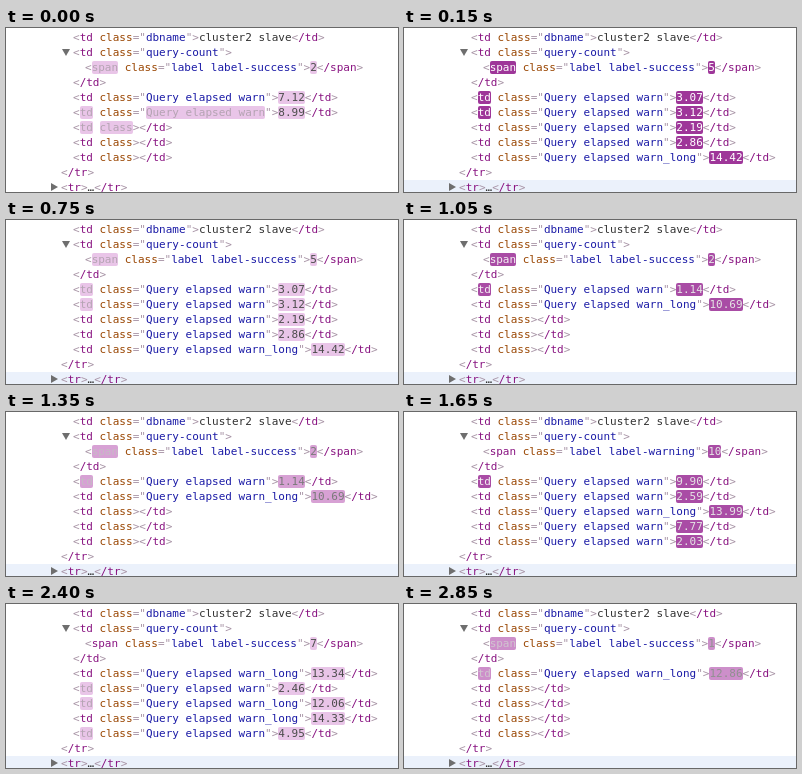
Recreate the animation shown at these times as an HTML page. Size 392 by 164 pixels, loop 3000 ms.

```html
<!DOCTYPE html>
<html lang="en">
<head>
<meta charset="utf-8">
<title>Element tree updates</title>
<style>
  html, body { margin: 0; width: 100%; height: 100%; overflow: hidden; background: #fff; }
  #tree {
    position: absolute; left: 0; top: 2px; width: 392px; height: 162px; overflow: hidden;
    font: 11px/15px "DejaVu Sans Mono", monospace; color: #303030;
  }
  .line { position: relative; height: 15px; white-space: pre; }
  .hover { background: #ebf1fb; }
  .p { color: rgb(168, 148, 166); }
  .tag { color: rgb(136, 18, 128); }
  .attr { color: rgb(153, 69, 0); }
  .val { color: rgb(26, 26, 166); }
  .hl { border-radius: 2px; }
  svg { position: absolute; left: 0; top: 0; width: 70px; height: 15px; fill: #6e6e6e; }
</style>
</head>
<body>
<div id="tree"></div>
<script>
const LOOP = 3000, STEP = 150, FADE = 1120;
const W = 'Query elapsed warn', L = W + '_long';
const FLASH = [158, 54, 153], PALE = [245, 219, 244];
const WHITE = [255, 255, 255], GREY = [168, 148, 166], DARK = [48, 48, 48];

// Row: [class, value, flashed parts]; parts: t = tag, c = attribute name, v = attribute value
const states = [
  { at: 0, age: 600, label: 'success', span: 't', count: 2,
    rows: [[W, '7.12', ''], [W, '8.99', 'tv'], ['', '', 'tc']] },
  { at: 150, age: 0, label: 'success', span: 't', count: 5,
    rows: [[W, '3.07', 't'], [W, '3.12', 't'], [W, '2.19', ''], [W, '2.86', ''], [L, '14.42', '']] },
  { at: 1050, age: 40, label: 'success', span: 't', count: 2,
    rows: [[W, '1.14', 't'], [L, '10.69', '']] },
  { at: 1650, age: 40, label: 'warning', span: '', count: 10,
    rows: [[W, '9.90', 't'], [W, '2.59', ''], [L, '13.99', ''], [W, '7.77', ''], [W, '2.03', '']] },
  { at: 1800, age: 0, label: 'success', span: '', count: 7,
    rows: [[L, '13.34', ''], [W, '2.46', 't'], [L, '12.06', 't'], [L, '14.33', ''], [W, '4.95', 't']] },
  { at: 2550, age: -50, label: 'success', span: 't', count: 1,
    rows: [[L, '12.86', 't']] }
];

// cubic-bezier(0, 0, .2, 1)
function ease(x) {
  let lo = 0, hi = 1;
  for (let i = 0; i < 24; i++) {
    const s = (lo + hi) / 2;
    if (0.6 * s * s * (1 - s) + s * s * s < x) lo = s; else hi = s;
  }
  return 3 * lo * lo * (1 - lo) + lo * lo * lo;
}

const mix = (a, b, k) => `rgb(${a.map((v, i) => Math.round(v + (b[i] - v) * k))})`;
const paint = (cls, text) => `<span class="${cls}">${text}</span>`;
const LT = paint('p', '&lt;'), GT = paint('p', '&gt;');
const close = name => LT + paint('tag', '/' + name) + GT;
const line = (x, html, cls = '') => `<div class="line ${cls}" style="padding-left:${x}px">${html}</div>`;
const arrow = d => `<svg><path d="${d}"/></svg>`;

function render(time) {
  const state = states.filter(s => s.at <= time).pop();
  const k = ease(Math.min(1, Math.max(0, time - state.at + state.age) / FADE));
  const back = mix(FLASH, PALE, k);

  const flash = (text, ink) =>
    `<span class="hl" style="background:${back};color:${mix(WHITE, ink, k)}">${text}</span>`;
  const part = (cls, text, on) => on ? flash(text, GREY) : paint(cls, text);
  const open = (name, value, parts = '') => {
    const has = c => parts.includes(c);
    const quoted = value && paint('p', '="') + part('val', value, has('v')) + paint('p', '"');
    return LT + part('tag', name, has('t')) + ' ' + part('attr', 'class', has('c')) + quoted + GT;
  };

  let html = line(67, open('td', 'dbname') + 'cluster2 slave' + close('td'));
  html += line(67, arrow('M56 4h8l-4 7z') + open('td', 'query-count'));
  html += line(79, open('span', 'label label-' + state.label, state.span) +
    flash(state.count, DARK) + close('span'));
  html += line(67, close('td'));
  for (let i = 0; i < 5; i++) {
    const [cls, value, parts] = state.rows[i] || ['', '', ''];
    html += line(67, open('td', cls, parts) + (value && flash(value, DARK)) + close('td'));
  }
  html += line(55, close('tr'));
  html += line(55, arrow('M45 3v8l7-4z') + LT + paint('tag', 'tr') + GT + '…' + close('tr'),
    time >= STEP ? 'hover' : '');
  tree.innerHTML = html;
}

const tree = document.getElementById('tree');
const start = performance.now();
let shown = -1;

function tick() {
  const time = Math.floor(((performance.now() - start) % LOOP) / STEP) * STEP;
  if (time !== shown) render(shown = time);
  requestAnimationFrame(tick);
}
tick();
</script>
</body>
</html>
```
